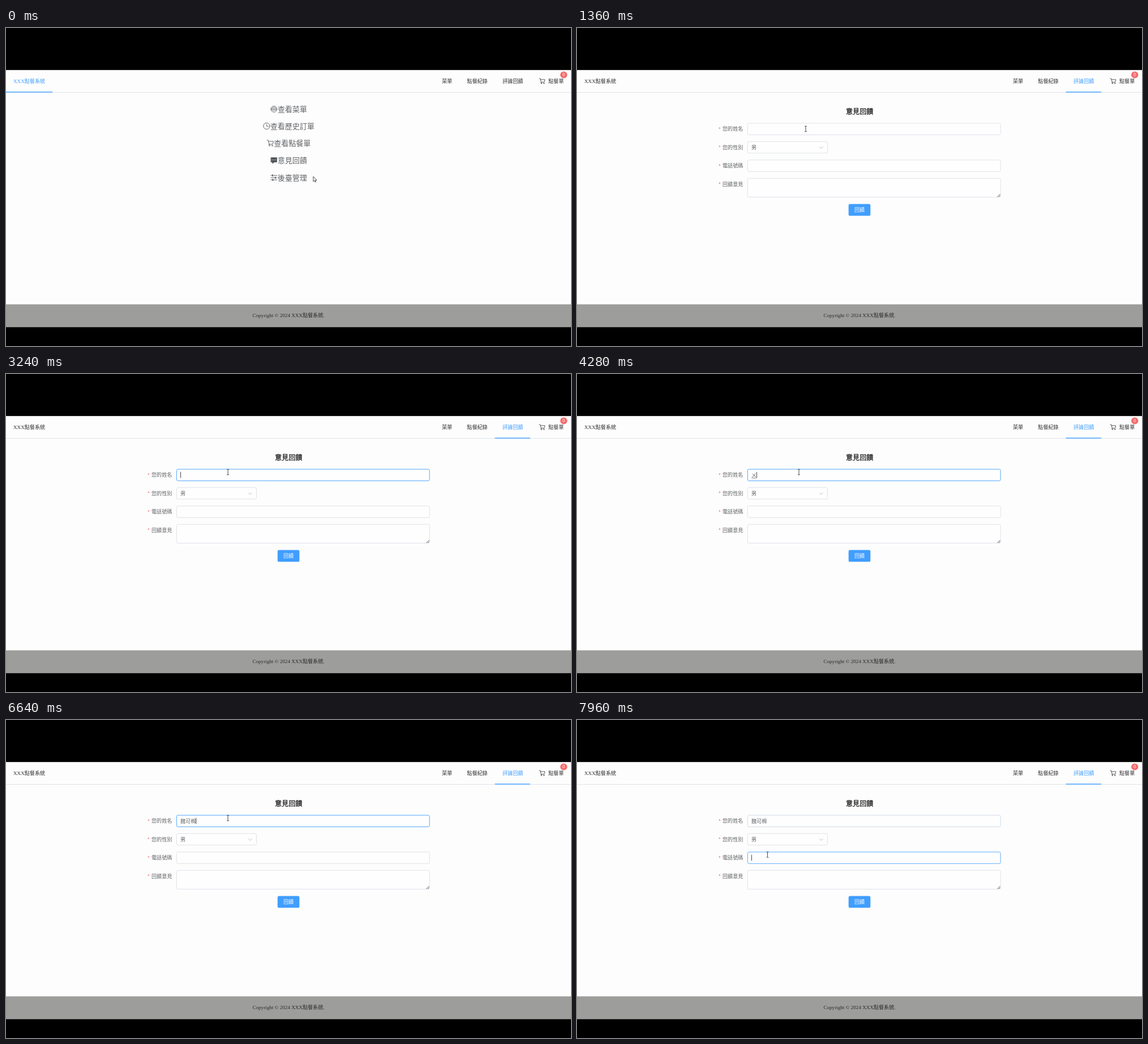
An HTML page for the animation above (8000 ms loop, 998 by 561 pixels).

```html
<!DOCTYPE html>
<html lang="zh-Hant">
<head>
<meta charset="utf-8">
<title>點餐系統</title>
<style>
  html, body { margin: 0; width: 100%; height: 100%; overflow: hidden; background: #000; }
  svg { display: block; width: 100%; height: 100%; }
  text { font: 9.1px "Noto Sans CJK TC", "Noto Sans CJK JP", "Noto Sans CJK", sans-serif; fill: #606266; white-space: pre; }
  .nav { fill: #303133; }
  .serif { font-family: "Liberation Serif", "Noto Sans CJK TC", "Noto Sans CJK JP", "Noto Sans CJK", serif; }
  .title { font-size: 12.1px; fill: #222; stroke: #222; stroke-width: .3; text-anchor: middle; }
  .link { font-size: 13px; }
  .mid { text-anchor: middle; }
  .icon { fill: none; stroke: #55585c; stroke-width: .9; stroke-linecap: round; stroke-linejoin: round; }
  .box { fill: #fefefe; stroke: #dcdfe6; stroke-width: .9; }
</style>
</head>
<body>
<svg viewBox="0 0 998 561" preserveAspectRatio="none">
  <defs>
    <path id="cart" d="M.8 1.3H2.7L4.5 8.6H10.7L12 3.4H3.2M4.5 8.6L4 10"/>
    <g id="cartWheels"><circle cx="5.2" cy="11" r=".8"/><circle cx="10" cy="11" r=".8"/></g>
  </defs>
  <rect width="998" height="561"/>
  <rect y="74" width="998" height="453.5" fill="#fdfdfd"/>
  <rect y="74" width="998" height="1" fill="#d9d5d8"/>
  <rect y="113" width="998" height="1" fill="#e2e4e8"/>
  <rect y="487.5" width="998" height="39.5" fill="#9d9d9b"/>
  <text class="serif mid" x="499" y="510" style="fill:#2c2c2c">Copyright © 2024 XXX點餐系統.</text>

  <text id="brand" class="serif" x="13" y="97.2">XXX點餐系統</text>
  <rect id="brandBar" y="112.4" width="82" height="1.4" fill="#409eff"/>
  <text class="nav" x="770" y="97">菜單</text>
  <text class="nav" x="814.3" y="97">點餐紀錄</text>
  <text id="review" x="877" y="97">評論回饋</text>
  <rect id="reviewBar" x="863.5" y="112.4" width="62.4" height="1.4" fill="#409eff"/>
  <g class="icon" transform="translate(941.3 88) scale(.88)" style="stroke:#303133"><use href="#cart"/><use href="#cartWheels"/></g>
  <text class="nav" x="958" y="97">點餐單</text>
  <rect x="979" y="76.8" width="12.4" height="11.6" rx="5.8" fill="#f56c6c"/>
  <text class="mid" x="985.2" y="85.4" style="fill:#fff;font-size:7.5px">0</text>

  <g id="home"></g>

  <g id="form">
    <text class="title" x="499.2" y="151.8">意見回饋</text>
    <g id="labels"></g>
    <rect class="box" id="nameBox" x="301.4" y="168" width="446.7" height="20.4" rx="2.4"/>
    <rect class="box" x="301.4" y="200.3" width="141" height="20.4" rx="2.4"/>
    <rect class="box" id="phoneBox" x="301.4" y="232.9" width="446.7" height="20.4" rx="2.4"/>
    <rect class="box" x="301.4" y="265.2" width="446.7" height="33.2" rx="2.4"/>
    <path d="M742.5 298L747.5 293M745.2 298L747.5 295.7" stroke="#444" stroke-width=".9"/>
    <text x="308" y="214">男</text>
    <path d="M428 209.3L431.3 212.6L434.6 209.3" fill="none" stroke="#b4b8c0" stroke-width=".9"/>
    <rect x="479.7" y="310.5" width="38.6" height="20.8" rx="2.6" fill="#409eff"/>
    <text class="mid" x="499" y="324.2" style="fill:#fff">回饋</text>
    <text id="name" x="308" y="181.6"></text>
    <rect id="composing" x="308.3" y="183" height=".7" fill="#606266"/>
    <rect id="caret" width=".9" height="10.5" fill="#333"/>
  </g>

  <g id="cursor">
    <path id="arrow" d="M0 0V8.8L2.1 7L3.4 10L4.7 9.4L3.4 6.5H6Z" fill="#fff" stroke="#222" stroke-width=".8"/>
    <path id="hand" d="M-1 0Q0-1 1 0V3.8L4.6 4.7Q5.4 5 5.2 6L4.4 10H-.8L-3.4 6.4Q-2.8 5.2-1 6.6Z" fill="#fff" stroke="#222" stroke-width=".8"/>
    <path id="beam" d="M-2-4.8H-.6L0-4.4L.6-4.8H2M0-4.4V4.4M-2 4.8H-.6L0 4.4L.6 4.8H2" fill="none" stroke="#333" stroke-width=".9"/>
  </g>
</svg>
<script>
const DURATION = 8000, OPEN = 780, FOCUS_NAME = 1720, FOCUS_PHONE = 7800;
const COMMIT = 6340, BLINK = 530, EM = 9.1;
const $ = id => document.getElementById(id);
const show = (id, on) => { $(id).style.display = on ? "" : "none"; };

// Home links: label, vertical centre, icon in a 13 px square.
const links = [
  ["查看菜單", 143, '<path d="M1 6.2H12Q12 9.4 8.6 11.6H4.4Q1 9.4 1 6.2ZM1.6 6Q1.8 1.5 6.5 1.3Q11.2 1.5 11.4 6M3.6 4.2Q6.5 2 9.4 4.2M2.3 8.4H10.7"/>'],
  ["查看歷史訂單", 173, '<circle cx="6.5" cy="6.5" r="5.6"/><path d="M6.5 3.3V6.8H9.5"/>'],
  ["查看點餐單", 203, '<use href="#cart"/><use href="#cartWheels"/>'],
  ["意見回饋", 233.5, '<path d="M1.5 1.8H11.5V9.6H7L4 12V9.6H1.5Z" fill="#4c4f53"/><path d="M3.9 5.7h.1M6.5 5.7h.1M9.1 5.7h.1" stroke="#fff" stroke-width="1.3"/>'],
  ["後臺管理", 264, '<path d="M1 2.6H12M1 6.5H12M1 10.4H12"/><path d="M4 1.6V3.6M9 5.5V7.5M4.5 9.4V11.4" stroke-width="1.7"/>']
].map(([label, y, icon]) => ({ label, y, icon, left: 499.3 - (label.length + 1) * 6.5 }));

$("home").innerHTML = links.map(({ label, y, icon, left }) =>
  `<g class="icon" transform="translate(${left} ${y - 6.5})">${icon}</g>
   <text class="link" x="${left + 13}" y="${y + 4.8}">${label}</text>`).join("");
const linkTexts = [...document.querySelectorAll(".link")];

$("labels").innerHTML = ["您的姓名", "您的性別", "電話號碼", "回饋意見"].map((label, i) => {
  const y = 181.4 + i * 32.4;
  return `<text x="249.8" y="${y + .6}" style="fill:#f56c6c">*</text><text x="257" y="${y}">${label}</text>`;
}).join("");

const typing = [
  [4280, "ㄨ"], [4460, "ㄨㄟ"], [4640, "魏"], [4840, "魏ㄎ"], [5000, "魏ㄎㄜ"], [5160, "魏可"],
  [5360, "魏可ㄇ"], [5520, "魏可ㄇㄧ"], [5700, "魏可ㄇㄧㄢ"], [5900, "魏可棉"], [COMMIT, "魏可棉"]
];

const path = [
  [0, 542.8, 262], [280, 542.8, 262], [640, 508, 235], [860, 508, 235], [1320, 404, 178],
  [1420, 404, 178], [1660, 392, 173], [6720, 392, 173], [7320, 332, 234], [7440, 332, 234],
  [7660, 336.5, 237.5], [DURATION, 336.5, 237.5]
];

const clamp = v => Math.max(0, Math.min(1, v));
const ease = v => v * v * (3 - 2 * v);
const ramp = (t, start, length) => ease(clamp((t - start) / length));
const mix = (a, b, k) => `rgb(${a.map((v, i) => Math.round(v + (b[i] - v) * k))})`;
const BLUE = [64, 158, 255], BORDER = [220, 223, 230], DARK = [48, 49, 51], TEXT = [96, 98, 102];

function cursorAt(t) {
  const i = path.findIndex(([end], n) => n > 0 && t <= end);
  const [t0, x0, y0] = path[i - 1], [t1, x1, y1] = path[i];
  const k = ease((t - t0) / (t1 - t0));
  return [x0 + (x1 - x0) * k, y0 + (y1 - y0) * k];
}

function cursorKind(x, y, hovered, formOpen) {
  if (!formOpen) return hovered >= 0 ? "hand" : "arrow";
  const inside = (left, top, right, bottom) => x >= left && x <= right && y >= top && y <= bottom;
  if (inside(301, 200, 442, 221)) return "hand";
  const field = [[168, 188], [233, 253], [265, 298]].some(([top, bottom]) => inside(301, top, 748, bottom));
  return field ? "beam" : "arrow";
}

function draw(t) {
  const formOpen = t >= OPEN;
  show("home", !formOpen);
  show("form", formOpen);

  const active = ramp(t, OPEN, 300);
  $("brand").style.fill = mix(BLUE, DARK, active);
  $("brandBar").style.opacity = 1 - active;
  $("review").style.fill = mix(DARK, BLUE, active);
  $("reviewBar").style.opacity = active;

  const [x, y] = cursorAt(t);
  const hovered = links.findIndex(l => Math.abs(y - l.y) < 8 && Math.abs(x - 499.3) < 499.3 - l.left);
  linkTexts.forEach((el, i) => { el.style.fill = mix(TEXT, BLUE, i === hovered ? 1 : 0); });
  const kind = cursorKind(x, y, hovered, formOpen);
  ["arrow", "hand", "beam"].forEach(id => show(id, id === kind));
  $("cursor").setAttribute("transform", `translate(${x} ${y})`);

  const phone = ramp(t, FOCUS_PHONE, 200);
  $("nameBox").style.stroke = mix(BORDER, BLUE, ramp(t, FOCUS_NAME, 200) - phone);
  $("phoneBox").style.stroke = mix(BORDER, BLUE, phone);

  const [keyTime, value] = typing.filter(([at]) => at <= t).pop() || [FOCUS_NAME, ""];
  const width = value.length * EM, onPhone = t >= FOCUS_PHONE;
  $("name").textContent = value;
  $("composing").setAttribute("width", Math.max(0, width - .6));
  show("composing", value && t < COMMIT);

  const since = t - (onPhone ? FOCUS_PHONE : keyTime);
  show("caret", t >= FOCUS_NAME && since % (2 * BLINK) < BLINK);
  $("caret").setAttribute("x", 308 + (onPhone ? 0 : width));
  $("caret").setAttribute("y", onPhone ? 237.8 : 172.8);
}

const start = performance.now();
function frame() {
  draw((performance.now() - start) % DURATION);
  requestAnimationFrame(frame);
}
frame();
</script>
</body>
</html>
```
